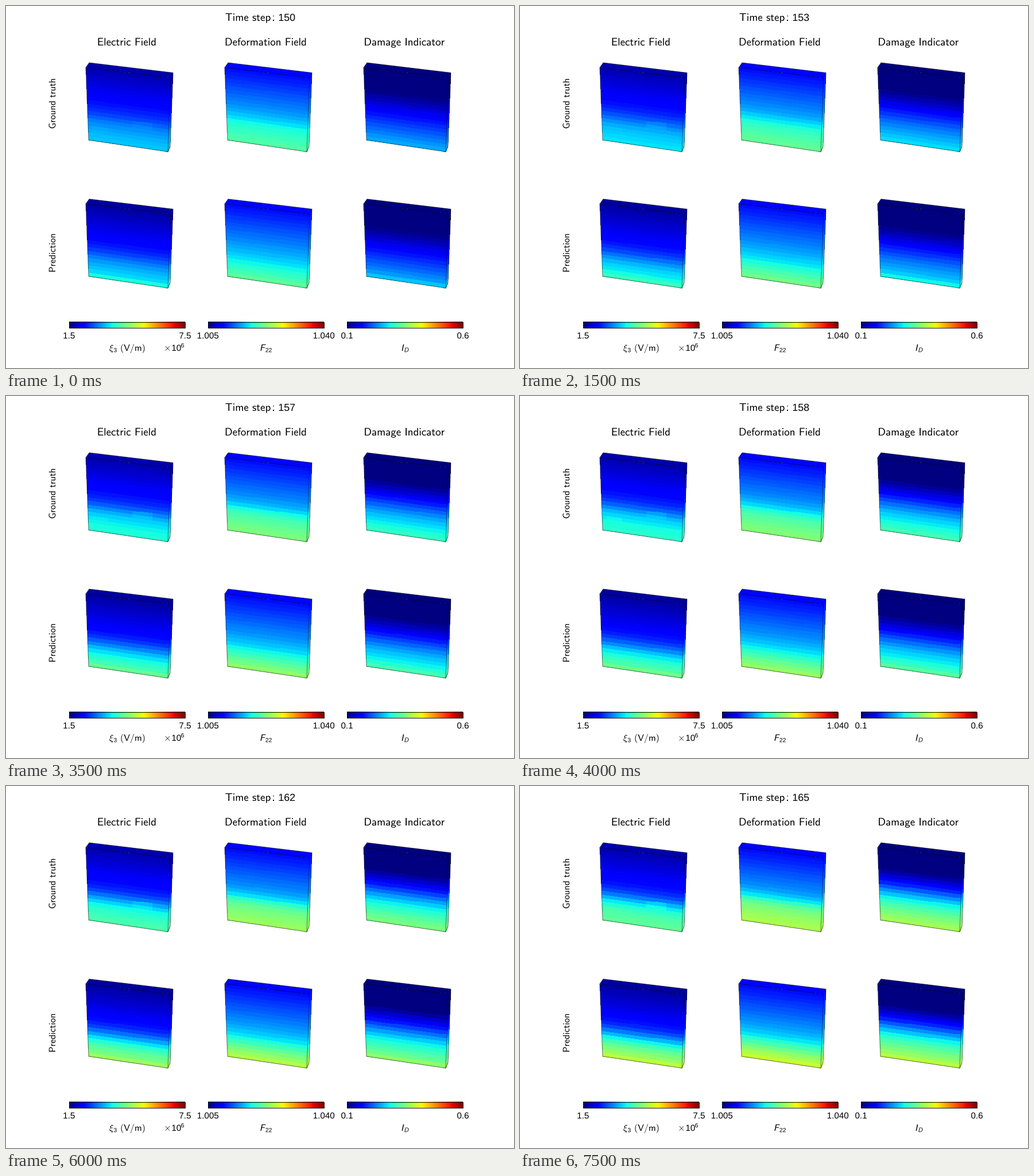
Write a matplotlib script that moves like this. It is 885 by 632 pixels and loops after 8 s.

```python
import numpy as np
import matplotlib.pyplot as plt
from matplotlib.animation import FuncAnimation
from matplotlib.patches import PathPatch, Polygon, Rectangle
from matplotlib.textpath import TextPath
from matplotlib.transforms import Affine2D

plt.rcParams["mathtext.fontset"] = "cm"
plt.rcParams["font.family"] = "Liberation Sans"

W, H, DPI = 885, 632, 100
FRAMES, INTERVAL = 16, 500
FIRST_STEP = 150
ROWS, COLS = 20, 20
DX, DY = 242, 238
PX = 72 / DPI
BIG, MID = 18.95, 16.1                    # letters
BIG_NUM, MID_NUM, SUB_NUM = 17.8, 15.2, 10.4   # digits

# Corners of the slab: front/back, top/bottom, left/right
FTL, FTR = np.array([139, 107.5]), np.array([287, 125.5])
FBL, FBR = np.array([144, 234]), np.array([282, 254.5])
BTL, BTR, BBR = np.array([145, 99]), np.array([291, 116.5]), np.array([286, 245])

fig = plt.figure(figsize=(W / DPI, H / DPI), dpi=DPI, facecolor="white")
ax = fig.add_axes([0, 0, 1, 1])
ax.axis("off")
cmap = plt.get_cmap("jet")


def field(top, slope, center, width, grow, rim=0):
    """Linear in depth, plus a step whose height grows with time."""
    def value(s, t):
        height = grow[0] + (grow[1] - grow[0]) * t
        step = height / (1 + np.exp((center - s) / width))
        return np.clip(top + slope * s + step + rim * s ** 30, 0, 1)
    return value


# Ground truth above, prediction below; columns as titled
FIELDS = [
    [field(.04, .20, .665, .06, (.085, .235)),
     field(.13, .27, .655, .045, (.055, .165)),
     field(-.12, .40, .55, .10, (.02, .28))],
    [field(.03, .19, .69, .075, (.13, .33), rim=.08),
     field(.13, .27, .78, .08, (.06, .20), rim=.03),
     field(-.12, .40, .55, .10, (.02, .28), rim=.06)],
]


def sans(s):
    return r"$\mathsf{%s}$" % s.replace(" ", r"\hspace{0.38}")


def glyphs(s, size, x, y, align=0.0, angle=0, slant=0):
    """Outline of s with its ink aligned at x and its baseline at y."""
    path = TextPath((0, 0), s, size=size)
    box = path.get_extents()
    move = (Affine2D().translate(-box.x0 - align * box.width, 0)
            .skew_deg(slant, 0).rotate_deg(angle)
            .scale(1, -1).translate(x, y))
    return move.transform_path(path)


def label(s, size, x, y, **kw):
    return ax.add_patch(PathPatch(glyphs(s, size, x, y, **kw), fc="black", lw=0))


def streaks(seed, count=3):
    """Mask of a few short runs of cells that stray towards the next row."""
    rng = np.random.default_rng(seed)
    mask = np.zeros((ROWS, COLS + 1))
    for _ in range(count):
        row, col = rng.integers(9, 17), rng.integers(1, 12)
        mask[row, col:col + rng.integers(3, 6)] = .5
    return mask


class Slab:
    def __init__(self, value, shift, mask):
        self.value, self.mask = value, mask
        s = np.linspace(0, 1, ROWS + 1)[:, None, None]
        u = np.linspace(0, 1, COLS + 1)[None, :, None]
        left, right = FTL + (FBL - FTL) * s, FTR + (FBR - FTR) * s
        side = BTR + (BBR - BTR) * s
        grid = np.concatenate([left + (right - left) * u, side], axis=1) + shift
        self.mesh = ax.pcolormesh(grid[..., 0], grid[..., 1],
                                  np.zeros((ROWS, COLS + 1)),
                                  cmap=cmap, vmin=0, vmax=1)
        self.top = ax.add_patch(
            Polygon(np.array([FTL, BTL, BTR, FTR]) + shift, lw=0))

        outline = np.array([FTL, BTL, BTR, BBR, FBR, FBL]) + shift
        ax.add_patch(Polygon(outline, fill=False, ec="black", alpha=.55,
                             lw=PX, joinstyle="round"))
        inner = np.array([FTL, FTR, FBR]) + shift
        ax.plot(*inner.T, color="black", alpha=.55, lw=.9 * PX)

    def update(self, t):
        s = (np.arange(ROWS)[:, None] + .5) / ROWS
        here, below = self.value(s, t), self.value(s + 1 / ROWS, t)
        self.mesh.set_array(here + (below - here) * self.mask)
        self.top.set_facecolor(cmap(float(self.value(0, t))))


def colorbar(x, low, high):
    ax.imshow(np.linspace(0, 1, 256)[None], cmap=cmap, aspect="auto",
              extent=(x, x + 202, 562, 551.5), interpolation="nearest")
    ax.add_patch(Rectangle((x, 551.5), 202, 10.5, fill=False, ec="black",
                           lw=.9 * PX))
    for text, pos in [(low, x), (high, x + 202)]:
        label(text, MID_NUM, pos, 580.5, align=.5)


slabs = [Slab(FIELDS[r][c], np.array([c * DX, r * DY]),
              streaks(4, count=3 if r == c == 0 else 0))
         for r in range(2) for c in range(3)]

label(sans("Time step"), BIG, 382.5, 26)
label(":", BIG_NUM, 465, 26)
counter = label(str(FIRST_STEP), BIG_NUM, 475.7, 26)

for i, title in enumerate(["Electric Field", "Deformation Field",
                           "Damage Indicator"]):
    label(sans(title), BIG, 210.5 + i * DX, 69, align=.5)
label(sans("Ground truth"), MID, 86, 170.5, align=.5, angle=90)
label(sans("Prediction"), MID, 86, 431, align=.5, angle=90)

for i, (low, high) in enumerate([("1.5", "7.5"), ("1.005", "1.040"),
                                 ("0.1", "0.6")]):
    colorbar(110 + i * DX, low, high)

label(r"$\xi$", MID, 180.3, 602)
label("3", SUB_NUM, 187.8, 604.3)
label(sans("(V/m)"), MID, 200.5, 602)
label(r"$\times$", MID, 277.5, 602)
label("10", MID_NUM, 289.5, 602)
label("6", SUB_NUM, 305.2, 596)
label(sans("F"), MID, 443.3, 602, slant=12)
label("22", SUB_NUM, 452.3, 604.3)
label(sans("I"), MID, 689.5, 602, slant=12)
label(sans("D"), 11.2, 694.2, 604.3, slant=12)

ax.set_xlim(0, W)
ax.set_ylim(H, 0)


def draw(i):
    for slab in slabs:
        slab.update(i / (FRAMES - 1))
    counter.set_path(glyphs(str(FIRST_STEP + i), BIG_NUM, 475.7, 26))
    return []


anim = FuncAnimation(fig, draw, frames=FRAMES, interval=INTERVAL,
                     repeat=True, repeat_delay=0)
plt.show()
```
